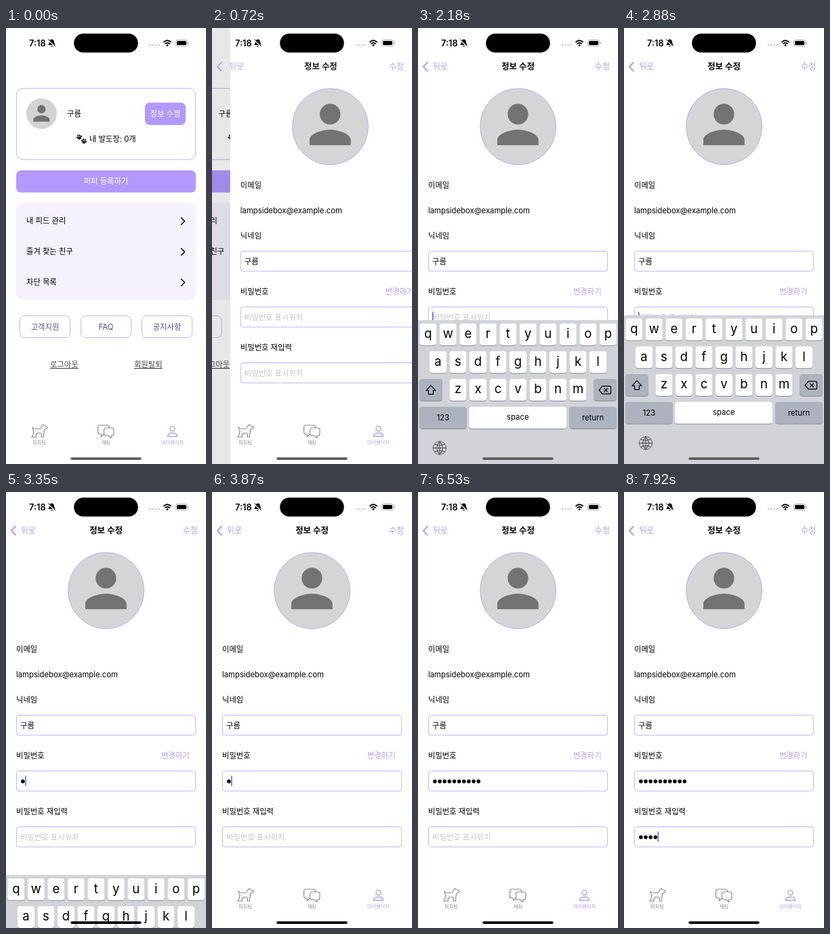
Write an HTML page that moves like this. It is 295x640 px and loops after 8000 ms.

```html
<!DOCTYPE html>
<html lang="ko">
<head>
<meta charset="utf-8">
<title>정보 수정</title>
<style>
  html, body { margin: 0; height: 100%; overflow: hidden; background: #fff; }
  svg { display: block; width: 100%; height: 100%; }
  text { font: 11.3px Inter, "Noto Sans CJK KR", "Noto Sans CJK", sans-serif; }
  rect, circle { stroke-width: .8; }
  .mid { text-anchor: middle; }
  .nav { font-size: 12px; fill: #b39dff; }
  .title { font-size: 12.4px; font-weight: 600; }
  .clock { font-size: 12.8px; font-weight: 600; }
  .white { fill: #fff; }
  .deep { fill: #5a45a8; }
  .hint { fill: #c5c5c8; }
  .link { fill: #444; text-decoration: underline; }
  .tab { font-size: 7.2px; fill: #8e8e93; }
  .purple { fill: #b39dff; }
  .key { font-size: 18.5px; }
  .line { fill: none; stroke-linecap: round; stroke-linejoin: round; }
</style>
</head>
<body>
<svg id="stage" viewBox="0 0 295 640"></svg>
<script>
const LOOP = 8000;
const PURPLE = '#b39dff';
const GRAY = '#8e8e93';
const stage = document.getElementById('stage');

const text = (x, y, s, cls = '', id = '') =>
  `<text x="${x}" y="${y}" class="${cls}" id="${id}">${s}</text>`;
const rect = (x, y, w, h, r, fill, stroke = 'none') =>
  `<rect x="${x}" y="${y}" width="${w}" height="${h}" rx="${r}" fill="${fill}" stroke="${stroke}"/>`;
const circle = (x, y, r, fill, stroke = 'none') =>
  `<circle cx="${x}" cy="${y}" r="${r}" fill="${fill}" stroke="${stroke}"/>`;
const line = (d, color, width = 1.2, fill = 'none') =>
  `<path class="line" d="${d}" stroke="${color}" style="stroke-width:${width};fill:${fill}"/>`;
const group = (id, body) => `<g id="${id}">${body}</g>`;
const repeat = (n, draw) => Array.from({ length: n }, (_, i) => draw(i)).join('');

const person = (x, y, scale) =>
  `<path transform="translate(${x} ${y}) scale(${scale})" fill="#737373"
    d="M0 4a4 4 0 1 1 0 8a4 4 0 1 1 0-8M0 14c-2.67 0-8 1.34-8 4v2h16v-2c0-2.66-5.33-4-8-4z"/>`;

const paw = (x, y, angle) => `<g transform="translate(${x} ${y}) rotate(${angle})">
  <ellipse cx="0" cy="1.6" rx="2.4" ry="2"/>
  ${[[-3, 0], [-1.2, -2.2], [1.2, -2.2], [3, 0]].map(([a, b]) =>
    `<ellipse cx="${a}" cy="${b}" rx=".95" ry="1.4"/>`).join('')}</g>`;

function profilePage() {
  const rows = ['내 피드 관리', '즐겨 찾는 친구', '차단 목록'];
  const buttons = ['고객지원', 'FAQ', '공지사항'];
  return rect(0, 0, 295, 640, 0, '#fff')
    + rect(15.4, 88.6, 264.2, 104.5, 10, '#fff', PURPLE)
    + circle(52.5, 125.7, 22.5, '#d3d3d3') + person(52.3, 107, 1.52)
    + text(90, 130, '구름')
    + rect(205, 109.5, 60, 33, 7, '#b199ff') + text(235, 130, '정보 수정', 'mid white')
    + paw(108, 160, -15) + paw(115, 166, 15)
    + text(123, 167, '내 발도장: 0개')
    + rect(15, 209, 265, 32.5, 7, '#b199ff') + text(147.5, 229, '퍼피 등록하기', 'mid white')
    + rect(15.4, 257.4, 264.2, 141, 10, '#f5f2fe', '#efeafb')
    + rows.map((s, i) => text(30, 287 + 45 * i, s)
        + line(`M258.5 ${278.5 + 45 * i}l5 5l-5 5`, '#000', 1.5)).join('')
    + buttons.map((s, i) => rect(20.4 + 90 * i, 422.4, 74.2, 32.2, 7, '#fff', PURPLE)
        + text(57.5 + 90 * i, 442.5, s, 'mid deep')).join('')
    + text(65, 498, '로그아웃', 'link') + text(189, 498, '회원탈퇴', 'link');
}

const field = y => rect(15.4, y, 264.2, 29.5, 4, '#fff', PURPLE);

const password = (id, y) => field(y)
  + text(21, y + 19, '비밀번호 표시위치', 'hint', id + 'Hint')
  + group(id + 'Dots', repeat(10, i => circle(24.9 + 7.15 * i, y + 15.2, 2.8, '#000')))
  + `<rect id="${id}Caret" y="${y + 7}" width="1.5" height="15" fill="#3d70e2"/>`;

function editPage() {
  return rect(0, 0, 295, 640, 0, '#fff')
    + circle(147.6, 144.7, 56, '#d5d5d5', PURPLE) + person(147.4, 96, 3.8)
    + text(15, 234.5, '이메일') + text(15, 272, 'lampsidebox@example.com')
    + text(15, 309, '닉네임') + field(327.5) + text(21, 346.5, '구름')
    + text(15, 391, '비밀번호') + text(229, 391, '변경하기', 'purple') + password('first', 409.5)
    + text(15, 473, '비밀번호 재입력') + password('second', 491.5);
}

const navBar = () => line('M14 50.5l-6 6.3l6 6.3', PURPLE, 2.1)
  + text(22, 61, '뒤로', 'nav', 'back')
  + text(147.5, 61, '정보 수정', 'mid title', 'title')
  + text(261, 61, '수정', 'nav');

const dog = 'M41 591q-2.5-2-1.5-5q1.500 2.500 4 2.500h6.500q2-1 2.500-4l2-2.500l2 1.500l4 1.500l.5 2.500l-4 1.500l-1 4l-.5 7.500h-3l-.5-5.500l-5.500-.5l-2.500 3l.5 3h-6.500l2.500-5z';
const backBubble = 'M138.500 583h11q3 0 3 3v7q0 3-3 3h-5l-4 4v-4h-2q-3 0-3-3v-7q0-3 3-3z';
const frontBubble = 'M147.500 587h8.500q3 0 3 3v5.500q0 3-3 3h-1v3.500l-4-3.500h-3.500q-3 0-3-3v-5.500q0-3 3-3z';
const user = 'M245.500 584.600a3.600 3.600 0 1 1 0 7.200a3.600 3.600 0 1 1 0-7.200M238.500 599.500q0-5 7-5t7 5z';

const tabBar = () => line(dog, GRAY)
  + line(backBubble, GRAY) + line(frontBubble, GRAY, 1.2, '#fff')
  + line(user, PURPLE, 1.4)
  + text(49, 611, '퍼피팅', 'mid tab') + text(147.5, 611, '채팅', 'mid tab')
  + text(245.5, 611, '마이페이지', 'mid tab purple');

function keyboard() {
  const dark = '#adb3be';
  const cap = (x, y, w, fill = '#fff') =>
    rect(x, y + 1, w, 32, 3.8, '#8b8d92') + rect(x, y, w, 32, 3.8, fill);
  const row = (letters, x, y) => [...letters].map((c, i) =>
    cap(x + 29.5 * i - 12.5, y, 25) + text(x + 29.5 * i, y + 21.4, c, 'mid key')).join('');
  return rect(0, 0, 295, 240, 0, '#d1d3d9')
    + row('qwertyuiop', 14.8, 5) + row('asdfghjkl', 29.5, 45.7) + row('zxcvbnm', 59, 86.4)
    + cap(2.2, 86.4, 33.5, dark) + cap(259.3, 86.4, 33.5, dark)
    + line('M19 96l-7 7.500h3.500v5.500h7v-5.500h3.500z', '#000')
    + line('M272 97h10.500q2 0 2 2v7.500q0 2-2 2h-10.500l-5-5.700zM274.500 100.200l5 5m0-5l-5 5', '#000')
    + cap(2.2, 127.2, 69.5, dark) + cap(75.2, 127.2, 144) + cap(223.3, 127.2, 69.5, dark)
    + text(37, 147.500, '123', 'mid') + text(147.3, 146.500, 'space', 'mid')
    + text(258, 147.500, 'return', 'mid')
    + `<g transform="translate(32 187.8)">${circle(0, 0, 9.6, 'none', '#444')}${
        line('M-9.600 0h19.200M0-9.600v19.200M-7.500-5.500q7.500 3 15 0M-7.500 5.500q7.500-3 15 0M0-9.600q-9 9.600 0 19.200q9-9.600 0-19.200', '#444', 1)}</g>`;
}

function statusBar() {
  return text(34, 26.6, '7:18', 'clock')
    + '<path d="M67.500 16.500q3.600.3 3.600 5l1.600 3.500h-10.400l1.600-3.500q0-4.700 3.600-5zM65.700 26h3.600q-1.800 2.500-3.600 0z"/>'
    + line('M62.500 17.500l10 9.500', '#fff', 2.2) + line('M62.500 16.800l10 9.800', '#000', 1)
    + rect(100.2, 8.3, 94.5, 27.8, 13.9, '#000')
    + repeat(4, i => circle(213 + 4.2 * i, 25, 1.3, '#c8c8c8'))
    + line('M233 20.500q5-4.600 10 0M235 23q3-2.600 6 0', '#000', 1.8) + circle(238, 25.4, 1.4, '#000')
    + rect(250.5, 17.5, 17, 9, 2.8, '#fff', '#999') + rect(252, 19, 14, 6, 1.6, '#000')
    + rect(268.6, 20.5, 1.2, 3, .6, '#999');
}

stage.innerHTML = group('profile', profilePage())
  + '<rect id="dim" width="295" height="640"/>'
  + group('edit', editPage()) + group('nav', navBar())
  + tabBar() + group('keys', keyboard()) + statusBar()
  + '<rect id="home" x="95.2" y="630.2" width="104.6" height="3.8" rx="1.9"/>';

const $ = id => document.getElementById(id);
const shift = (id, x, y = 0) => $(id).setAttribute('transform', `translate(${x} ${y})`);
const show = (id, on) => $(id).style.display = on ? '' : 'none';

// Critically damped spring, begun at `start` and drawn in `count` held steps.
function spring(t, start, from, to, count) {
  if (t < from) return 0;
  const step = (to - from) / (count - 1);
  const i = Math.floor((t - from + 8) / step);
  if (i >= count - 1) return 1;
  const u = 0.0167 * Math.max(0, from + i * step - start);
  return 1 - (1 + u) * Math.exp(-u);
}

const inputs = {
  first: {
    typed: [[3250, 1], [4450, 0], [4590, 2], [4730, 3], [4990, 4], [5240, 5], [5350, 6],
            [5640, 7], [5870, 8], [6220, 9], [6530, 10]],
    caret: [[1840, 2400], [2760, 4060], [4450, 6530]]
  },
  second: {
    typed: [[6930, 1], [7040, 2], [7190, 3], [7920, 4]],
    caret: [[6930, 7690], [7920, LOOP]]
  }
};

function drawInput(id, t) {
  const { typed, caret } = inputs[id];
  const count = typed.reduce((n, [time, value]) => t >= time ? value : n, 0);
  show(id + 'Hint', !count);
  [...$(id + 'Dots').children].forEach((dot, i) => dot.style.display = i < count ? '' : 'none');
  $(id + 'Caret').setAttribute('x', 21 + 7.15 * count);
  show(id + 'Caret', caret.some(([on, off]) => t >= on && t < off));
}

function draw(t) {
  const push = spring(t, 485, 500, 950, 5);
  const rest = 1 - push;
  shift('profile', -88.5 * push);
  $('dim').style.opacity = 0.1 * push;
  shift('edit', 295 * rest);
  $('nav').style.opacity = push;
  shift('title', 142 * rest);
  shift('back', 34 * rest);

  const raised = spring(t, 1865, 1840, 2520, 7) - spring(t, 3222, 3250, 3870, 7);
  shift('keys', 0, 640 - 218.4 * raised);
  show('keys', raised > 0);
  $('home').setAttribute('fill', t < 3250 ? '#5c5c5c' : '#000');

  drawInput('first', t);
  drawInput('second', t);
}

const begin = performance.now();
function tick() {
  draw((performance.now() - begin) % LOOP);
  requestAnimationFrame(tick);
}
tick();
</script>
</body>
</html>
```
